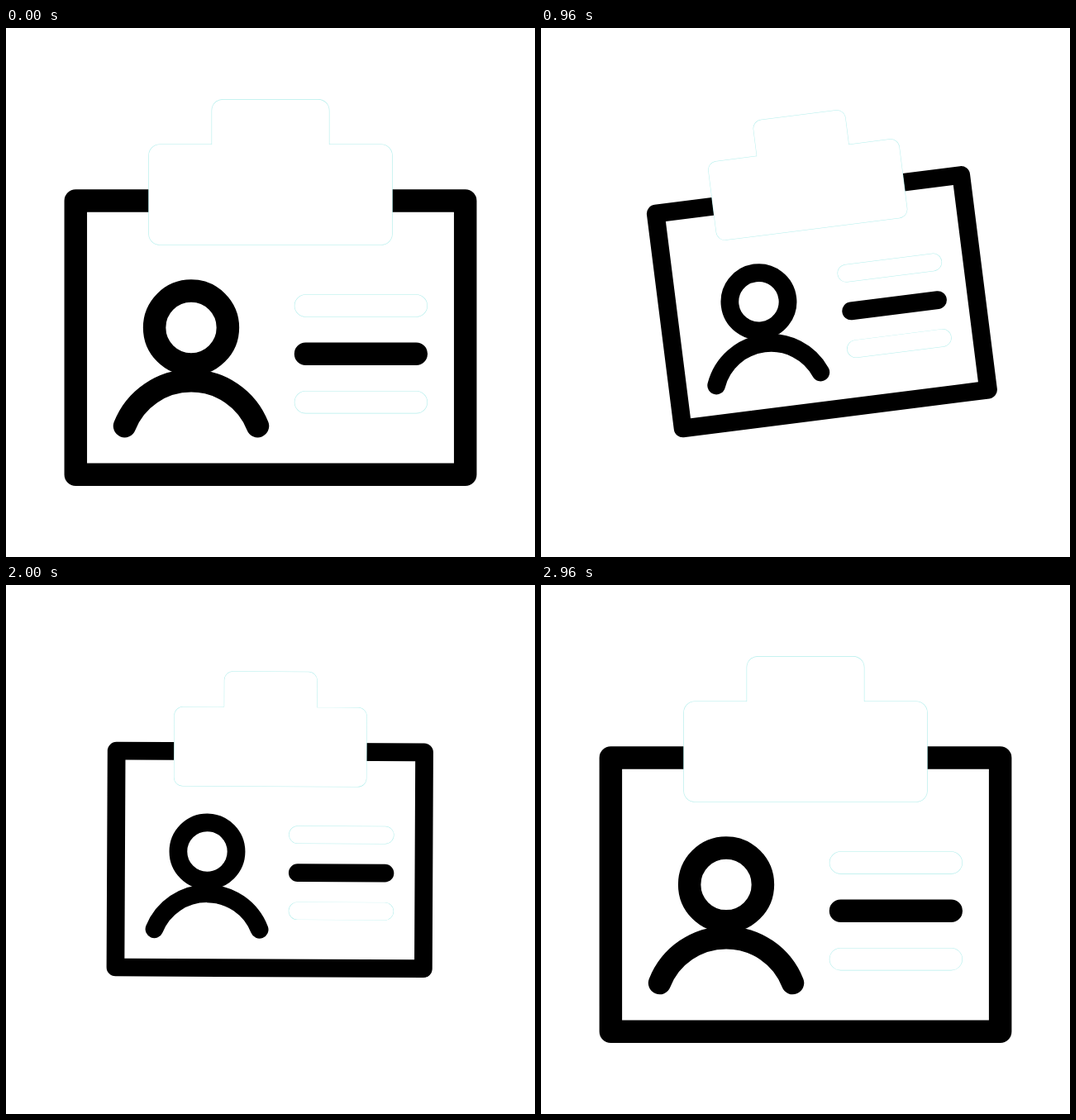
These frames come from a looping animation (640 px wide and 640 px high, 3000 ms). An HTML page:

```html
<!DOCTYPE html>
<html>
<head>
<meta charset="utf-8">
<style>
  html, body { margin: 0; height: 100%; overflow: hidden; background: #fff; }
  svg { display: block; width: 100vw; height: 100vh; }
  g { fill: none; stroke-width: 27.5; stroke-linecap: round; stroke-linejoin: round; }
  .ink { stroke: #000; }
  .edge { stroke: #b2eeec; }
  .paper { stroke: #fff; stroke-width: 26.3; fill: #fff; }
</style>
</head>
<body>
<svg viewBox="0 0 640 640">
  <defs>
    <path id="clip" d="M186 154.2H262.3V99.8H377.7V154.2H454V249H186Z"/>
    <path id="lines" d="M362.5 336H496.3M362.5 452.7H496.3"/>
  </defs>
  <g id="badge">
    <g class="ink">
      <rect x="84.3" y="208.9" width="471.4" height="331.4"/>
      <circle cx="224" cy="362.5" r="44.4"/>
      <path d="M143.5 481.6A86.5 86.5 0 0 1 304.5 481.6M362.5 394.3H496.3"/>
    </g>
    <g class="edge"><use href="#clip"/><use href="#lines"/></g>
    <g class="paper"><use href="#clip"/><use href="#lines"/></g>
  </g>
</svg>
<script>
  const LOOP = 3000, PIVOT_X = 320, PIVOT_Y = 173.7;
  // [time in ms, value]
  const SWING = [[0, 0], [595, 9.25], [1145, -10.1], [1670, 2], [2290, -0.92], [3000, 0]];
  const ZOOM = [[0, 1], [595, 0.79], [2380, 0.79], [3000, 1]];
  const badge = document.getElementById('badge');

  const ease = x => x < 0.5 ? 4 * x ** 3 : 1 - 4 * (1 - x) ** 3;

  function valueAt(keys, t) {
    const i = keys.findIndex(key => key[0] > t);
    const [t0, a] = keys[i - 1], [t1, b] = keys[i];
    return a + (b - a) * ease((t - t0) / (t1 - t0));
  }

  function draw() {
    const t = performance.now() % LOOP;
    badge.setAttribute('transform',
      `translate(${PIVOT_X} ${PIVOT_Y}) rotate(${valueAt(SWING, t)}) ` +
      `scale(${valueAt(ZOOM, t)}) translate(${-PIVOT_X} ${-PIVOT_Y})`);
    requestAnimationFrame(draw);
  }
  draw();
</script>
</body>
</html>
```
